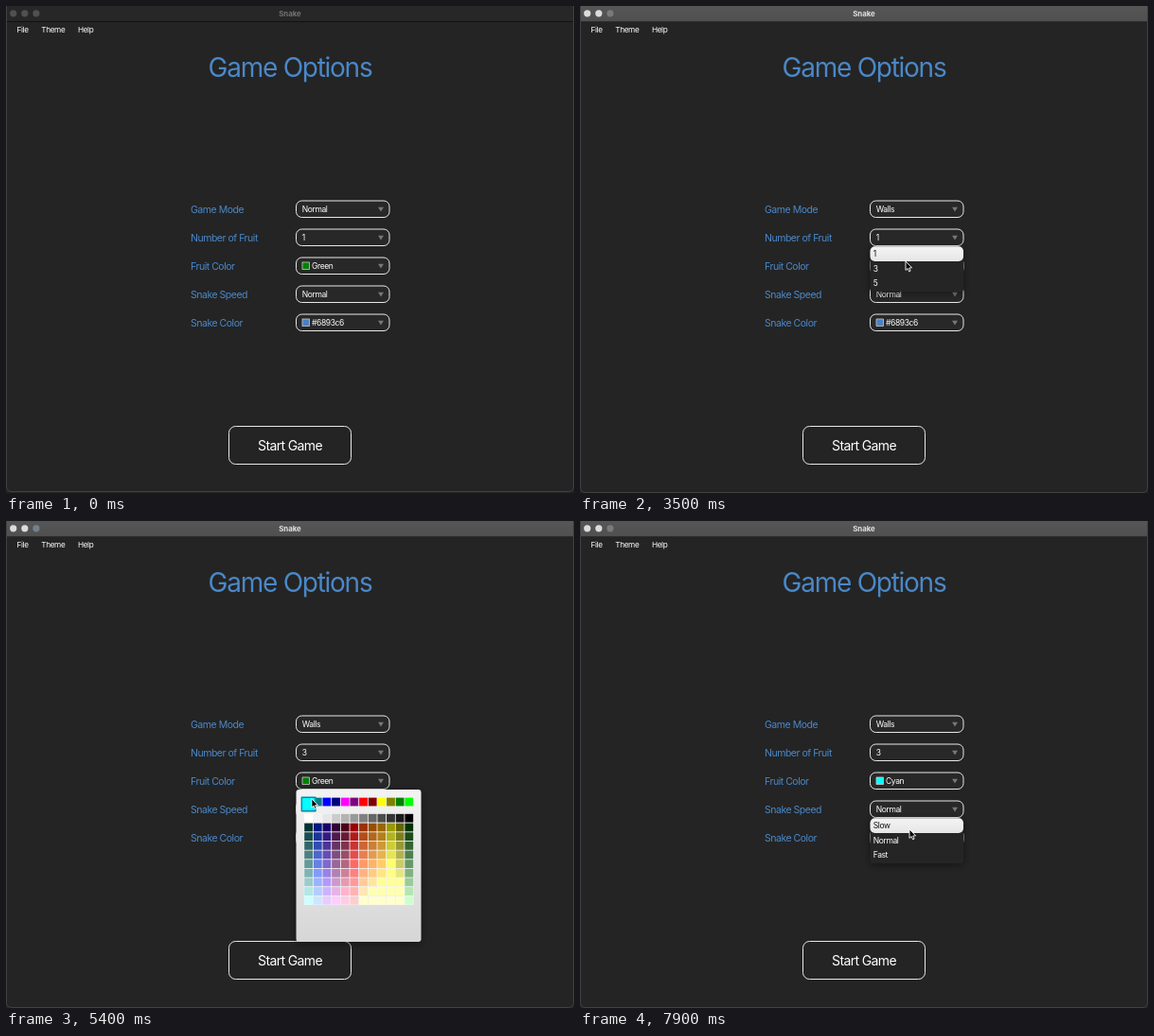
Write an HTML page with a canvas that moves like this. It is 600x515 px and loops after 8 s.

```html
<!DOCTYPE html>
<html lang="en">
<head>
<meta charset="utf-8">
<title>Snake</title>
<style>
  html, body { margin: 0; width: 100%; height: 100%; overflow: hidden; background: #242424; }
  canvas { display: block; width: 600px; height: 515px; }
</style>
</head>
<body>
<canvas id="stage"></canvas>
<script>
const LOOP = 8000, STEP = 100;
const W = 600, H = 515;
const BLUE = '#4a88c8';
const canvas = document.getElementById('stage');
const ctx = canvas.getContext('2d');
const ratio = window.devicePixelRatio || 1;
canvas.width = W * ratio;
canvas.height = H * ratio;
ctx.scale(ratio, ratio);

// Pointer stops: time, x, y
const path = [
  [500, 404, 262], [900, 358, 213], [1300, 358, 213], [1800, 346, 246],
  [3200, 345, 248], [3500, 344, 270], [3800, 344, 278], [4100, 345, 278],
  [4600, 360, 276], [5100, 360, 276], [5500, 316, 297], [5900, 316, 297],
  [6600, 348, 308], [7400, 348, 309], [7900, 348, 326]
];

// Open popups: start, end, row
const popups = [
  { from: 1000, to: 2100, row: 0, items: ['Normal', 'Walls', 'Free Play'] },
  { from: 2700, to: 4000, row: 1, items: ['1', '3', '5'] },
  { from: 4700, to: 5700, row: 2 },
  { from: 7200, to: 8000, row: 3, items: ['Slow', 'Normal', 'Fast'] }
];

const standard = ['aqua', 'teal', 'blue', 'navy', 'fuchsia', 'purple',
  'red', 'maroon', 'yellow', 'olive', 'green', 'lime'];
const greys = [255, 242, 230, 204, 179, 153, 128, 102, 77, 51, 26, 0];
const darkest = [
  [0, 51, 51], [0, 26, 128], [26, 0, 104], [51, 0, 51], [77, 0, 26], [153, 0, 0],
  [153, 51, 0], [153, 77, 0], [153, 102, 0], [153, 153, 0], [102, 102, 0], [0, 51, 0]
];

const rowY = i => 214.5 + 30 * i;

function text(str, x, y, size, color, { align = 'left', weight = 400, track = -0.045 } = {}) {
  ctx.font = `${weight} ${size}px Inter, Roboto, sans-serif`;
  ctx.letterSpacing = `${track * size}px`;
  ctx.textAlign = align;
  ctx.fillStyle = color;
  ctx.fillText(str, x, y + size * 0.36);
}

function round(x, y, w, h, r, fill, stroke) {
  ctx.beginPath();
  ctx.roundRect(x, y, w, h, r);
  if (fill) { ctx.fillStyle = fill; ctx.fill(); }
  if (stroke) { ctx.strokeStyle = stroke; ctx.lineWidth = 1; ctx.stroke(); }
}

function shadow(on) {
  ctx.shadowColor = on ? 'rgba(0,0,0,.45)' : 'transparent';
  ctx.shadowBlur = on ? 8 * ratio : 0;
  ctx.shadowOffsetY = on ? 2 * ratio : 0;
}

function gradient(y0, y1, a, b) {
  const g = ctx.createLinearGradient(0, y0, 0, y1);
  g.addColorStop(0, a);
  g.addColorStop(1, b);
  return g;
}

function pointer(t) {
  if (t < path[0][0]) return null;
  const i = path.findIndex(p => p[0] > t);
  if (i < 0) { const p = path[path.length - 1]; return { x: p[1], y: p[2] }; }
  const [t0, x0, y0] = path[i - 1], [t1, x1, y1] = path[i];
  const k = (t - t0) / (t1 - t0), e = k * k * (3 - 2 * k);
  return { x: x0 + (x1 - x0) * e, y: y0 + (y1 - y0) * e };
}

function drawWindow(active, picking) {
  ctx.fillStyle = '#242424';
  ctx.fillRect(0, 0, W, H);
  ctx.fillStyle = active ? gradient(0, 16, '#565656', '#505050') : '#272727';
  ctx.fillRect(0, 0, W, 16);
  ctx.fillStyle = active ? '#2e2e2e' : '#111';
  ctx.fillRect(0, 16, W, 1);
  const dots = active ? ['#dcdcdc', '#dcdcdc', picking ? '#74818d' : '#7a7a7a'] : Array(3).fill('#505050');
  dots.forEach((c, i) => {
    ctx.beginPath();
    ctx.arc(7.7 + 12.1 * i, 7.8, 3.6, 0, 7);
    ctx.fillStyle = c;
    ctx.fill();
  });
  text('Snake', 300, 7.7, 7.8, active ? '#e4e4e4' : '#747474', { align: 'center', weight: 700, track: 0 });
  round(0.5, -8, W - 1, active ? H + 7.5 : H + 6.5, 5, null, '#424242');
  text('File', 11.5, 25.3, 8.2, '#fff');
  text('Theme', 37.3, 25.3, 8.2, '#fff');
  text('Help', 76, 25.3, 8.2, '#fff');
}

function drawBox(y, label, swatch) {
  round(306.5, y - 8.5, 98.5, 17.5, 6, '#282828', '#e8e8e8');
  if (swatch) {
    ctx.fillStyle = swatch;
    ctx.fillRect(313, y - 3.5, 7.5, 7.5);
    ctx.strokeStyle = '#c8c8c8';
    ctx.lineWidth = 0.8;
    ctx.strokeRect(313, y - 3.5, 7.5, 7.5);
  }
  text(label, swatch ? 323 : 312.7, y + 0.2, 8.5, '#fff');
  ctx.beginPath();
  ctx.moveTo(393, y - 1.8);
  ctx.lineTo(399, y - 1.8);
  ctx.lineTo(396, y + 3);
  ctx.closePath();
  ctx.fillStyle = '#777';
  ctx.fill();
}

function drawOptions(t) {
  text('Game Options', 300, 64.5, 28, BLUE, { align: 'center' });
  ['Game Mode', 'Number of Fruit', 'Fruit Color', 'Snake Speed', 'Snake Color']
    .forEach((s, i) => text(s, 195, rowY(i) + 0.3, 10.5, BLUE));
  drawBox(rowY(0), t < 2100 ? 'Normal' : 'Walls');
  drawBox(rowY(1), t < 4000 ? '1' : '3');
  if (t < 5700) drawBox(rowY(2), 'Green', '#008000');
  else drawBox(rowY(2), 'Cyan', '#00ffff');
  drawBox(rowY(3), 'Normal');
  drawBox(rowY(4), '#6893c6', '#4a80c4');
  round(235.5, 444.5, 129, 40, 7, '#242424', '#e8e8e8');
  text('Start Game', 300, 464.7, 14, '#fff', { align: 'center' });
}

function drawList(y, items, mouse) {
  shadow(true);
  round(306.5, y + 9.5, 98.5, 48, 2, '#252525');
  shadow(false);
  const dy = mouse.y - y;
  const hover = dy < 9.5 ? -1 : Math.floor((dy - 10.7) / 15.7);
  items.forEach((s, i) => {
    const mid = y + 17.6 + 15.6 * i;
    if (i === hover) round(306.5, mid - 7.9, 98.5, 15.8, 5, gradient(mid - 8, mid + 8, '#f4f4f4', '#e6e6e6'));
    text(s, 309.7, mid, 8.5, i === hover ? '#111' : '#fff');
  });
}

function drawPicker(mouse) {
  const left = 314.8, size = 9.65;
  shadow(true);
  round(306.5, 284, 132, 161, 3, gradient(284, 445, '#f3f3f3', '#d6d6d6'));
  shadow(false);
  const cell = (col, y, color) => {
    ctx.fillStyle = '#f6f6f6';
    ctx.fillRect(left + col * size, y, size, size);
    ctx.fillStyle = color;
    ctx.fillRect(left + col * size + 0.4, y + 0.4, size - 0.8, size - 0.8);
  };
  standard.forEach((c, i) => cell(i, 292.2, c));
  greys.forEach((v, i) => cell(i, 309.4, `rgb(${v},${v},${v})`));
  for (let r = 0; r < 9; r++) {
    darkest.forEach((base, i) => {
      const rgb = base.map(v => Math.min(255, Math.round(v + 25.5 * r)));
      cell(i, 319.2 + r * size, `rgb(${rgb})`);
    });
  }
  const inRow = mouse.y > 292 && mouse.y < 302;
  const focus = inRow ? Math.max(0, Math.min(11, Math.floor((mouse.x - left) / size))) : 10;
  const mid = left + (focus + 0.5) * size;
  ctx.fillStyle = standard[focus];
  ctx.fillRect(mid - 7.5, 292, 15, 15);
  ctx.strokeStyle = '#16809c';
  ctx.lineWidth = 1.4;
  ctx.strokeRect(mid - 7.3, 292.2, 14.6, 14.6);
}

function drawPointer({ x, y }) {
  const shape = [[0, 0], [0, 9.4], [2.1, 7.5], [3.6, 10.8], [5.1, 10.1], [3.7, 7], [6.6, 6.8]];
  ctx.beginPath();
  shape.forEach(([a, b]) => ctx.lineTo(x + a, y + b));
  ctx.closePath();
  ctx.fillStyle = '#000';
  ctx.fill();
  ctx.strokeStyle = '#fff';
  ctx.lineWidth = 0.9;
  ctx.lineJoin = 'round';
  ctx.stroke();
}

function draw(t) {
  const mouse = pointer(t);
  const open = popups.find(p => t >= p.from && t < p.to);
  drawWindow(t >= 1000, open && !open.items);
  drawOptions(t);
  if (open && open.items) drawList(rowY(open.row), open.items, mouse);
  else if (open) drawPicker(mouse);
  if (mouse) drawPointer(mouse);
}

const start = performance.now();
function tick(now) {
  const t = Math.max(0, now - start) % LOOP;
  draw(Math.floor(t / STEP) * STEP);
  requestAnimationFrame(tick);
}
draw(0);
requestAnimationFrame(tick);
</script>
</body>
</html>
```
